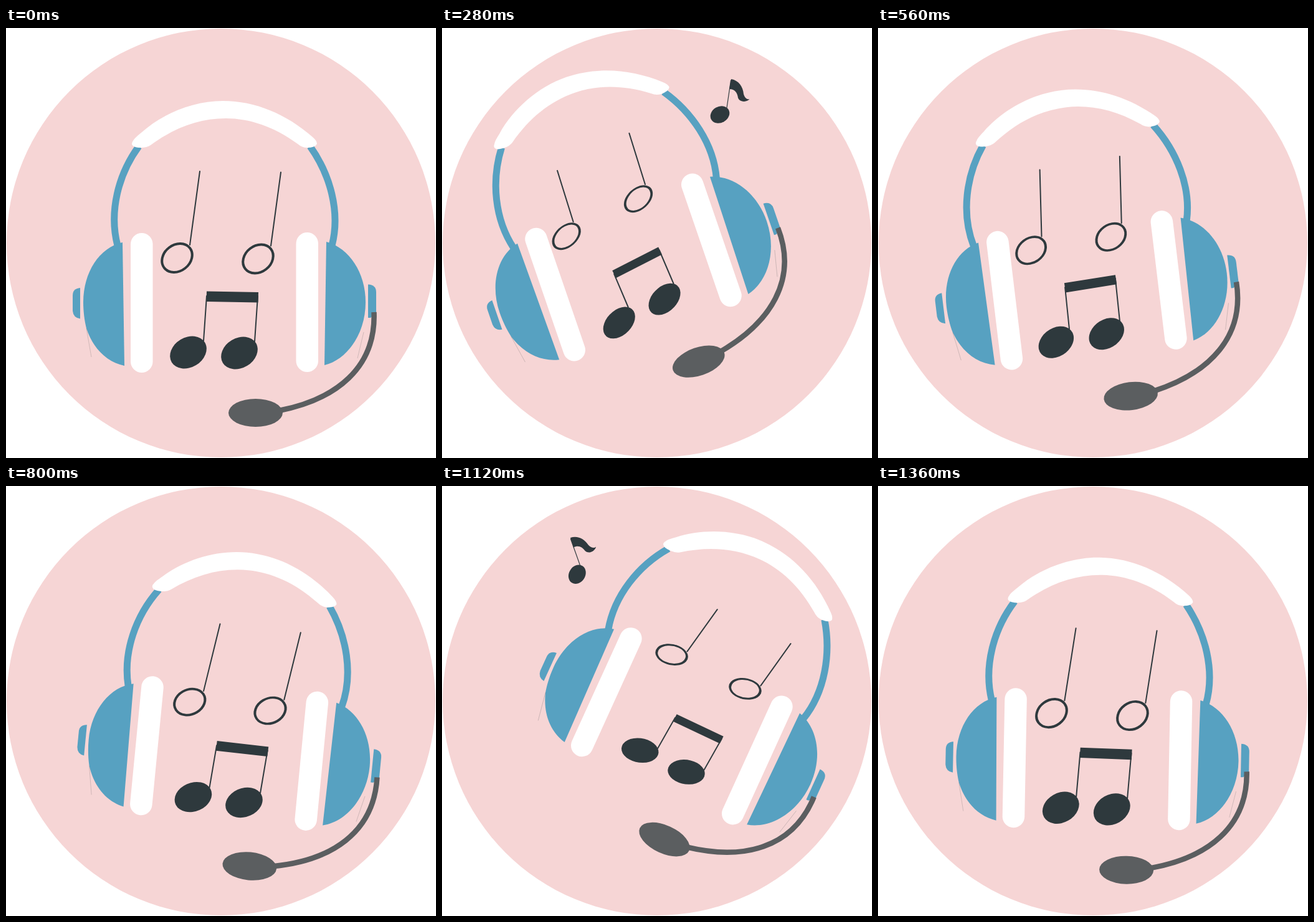
Write an HTML page that moves like this. It is 690 px wide and 690 px high and loops after 1400 ms.

```html
<!DOCTYPE html>
<html lang="en">
<head>
<meta charset="utf-8">
<title>Headset and notes</title>
<style>
  html, body { margin: 0; height: 100%; overflow: hidden; background: #fff; }
  svg { display: block; width: 100vw; height: 100vh; }
  .blue { fill: #57a1c1; }
  .white { fill: #fff; }
  .grey { fill: #5b5e60; }
  .dark { fill: #2e393d; }
  .line { fill: none; stroke: #2e393d; stroke-width: 2; stroke-linecap: round; }
  .strap { fill: none; stroke: #57a1c1; stroke-width: 11; }
  .arm { fill: none; stroke: #5b5e60; stroke-width: 8.5; }
  .hair { fill: none; stroke: #5b5e60; stroke-width: .7; opacity: .35; }
</style>
</head>
<body>
<svg viewBox="0 0 690 690">
  <defs>
    <g id="half">
      <ellipse class="line" style="stroke-width:4" rx="26" ry="21" transform="rotate(-38)"/>
      <path class="line" d="M20.5-21 36.5-139"/>
    </g>
    <!-- eighth note, anchored at the top of its stem -->
    <g id="eighth">
      <ellipse class="dark" cx="-18" cy="57" rx="16" ry="13" transform="rotate(-30 -18 57)"/>
      <path class="line" style="stroke-width:1.2" d="M-7 46-.5 2"/>
      <path class="dark" d="M0 0C12 2 19 12 20 24C22 31 26 33 29.5 32C26 37 14 38 11 30C10 22 6 16-3 16Z"/>
    </g>
  </defs>

  <circle cx="345" cy="345" r="344" fill="#f6d5d5"/>

  <g id="headset">
    <path class="strap" d="M213 190C180 235 165 295 179 349M488 190C520 235 537 295 523 349"/>
    <path class="blue" d="M187 344C150 352 124 392 124 440C124 455 126 470 129 482C140 515 162 536 190 542Z"/>
    <path class="blue" d="M514 343C551 353 577 393 577 440C577 490 548 532 511 541Z"/>
    <path class="hair" d="M129 482 137 528M574 488 564 530"/>
    <path class="blue" d="M119 417Q107 418 107 429V454Q108 465 119 466.5Z"/>
    <path class="blue" d="M581 411.5Q594 412 594 424V457L585 465H581Z"/>
    <path class="arm" d="M590.5 456C594 545 530 596 438 614"/>
    <ellipse class="grey" cx="400.5" cy="617.5" rx="43.5" ry="22.5"/>
    <rect class="white" x="200" y="329" width="35.5" height="224" rx="17.75"/>
    <rect class="white" x="465.5" y="328" width="35.5" height="224" rx="17.75"/>
    <path class="white" d="M204 181C206 177 211 173 217 168C250 138 300 117 348 117C400 117 450 138 492 175
      Q499 181 499 186Q496 192 483 192Q475 192 468 186C430 158 390 145 353 145C310 145 270 160 232 188
      Q226 192 217 192Q203 192 202 186Q202 183 204 181Z"/>
  </g>

  <g id="halves">
    <use href="#half" x="274.5" y="369"/>
    <use href="#half" x="404.5" y="370.5"/>
  </g>

  <g id="beamed">
    <path class="dark" d="M322 422.5 405 424 404.5 440.5 321.5 439Z"/>
    <path class="line" d="M322 430 317 502M404 430 399 503"/>
    <ellipse class="dark" cx="292.5" cy="520.5" rx="31" ry="24" transform="rotate(-31 292.5 520.5)"/>
    <ellipse class="dark" cx="374.5" cy="521.5" rx="31" ry="24" transform="rotate(-31 374.5 521.5)"/>
  </g>

  <use id="noteRight" href="#eighth" transform="translate(464 82)"/>
  <use id="noteLeft" href="#eighth" transform="translate(206 83) rotate(-28)"/>
</svg>
<script>
  const LOOP = 1400, STEP = 40;
  const KEYS = [0, 360, 680, 1080, LOOP];
  const byId = id => document.getElementById(id);
  const ease = p => p * p * (3 - 2 * p);

  // Each part swings from rest to a left pose and a right pose: [dx, dy, angle, scaleY]
  const parts = [
    { id: "headset", pivot: [350, 378], left: [-73, -60.6, -21.7, 1], right: [63, -52, 25.6, 1] },
    { id: "halves", pivot: [339.5, 369.75], left: [-94, -75, -32, .68], right: [92, -75, 25.6, .68] },
    { id: "beamed", pivot: [333.5, 484], left: [-30.7, -64.4, -32, .778], right: [35, -72, 25.6, .778], bend: 8 }
  ];

  function place({ id, pivot: [px, py], left, right, bend = 0 }, leg, p) {
    const amount = leg % 2 ? 1 - ease(p) : ease(p);
    const [dx, dy, angle, scale] = leg < 2 ? left : right;
    // the path runs sideways through the rest pose in mid loop
    const q = 1 - p;
    const curve = leg === 1 ? -3 * q * p * p : leg === 2 ? 3 * p * q * q : 0;
    const x = px + dx * amount + bend * curve, y = py + dy * amount;
    byId(id).setAttribute("transform",
      `translate(${x} ${y}) rotate(${angle * amount}) scale(1 ${1 + (scale - 1) * amount}) translate(${-px} ${-py})`);
  }

  const show = (id, on) => byId(id).setAttribute("visibility", on ? "visible" : "hidden");

  function draw(now) {
    const t = Math.floor((now % LOOP) / STEP) * STEP;
    const leg = KEYS.findIndex((k, i) => t < KEYS[i + 1]);
    const p = (t - KEYS[leg]) / (KEYS[leg + 1] - KEYS[leg]);
    for (const part of parts) place(part, leg, p);
    show("noteRight", t >= 240 && t < 480);
    show("noteLeft", t >= 960 && t < 1200);
    requestAnimationFrame(draw);
  }
  draw(performance.now());
</script>
</body>
</html>
```
